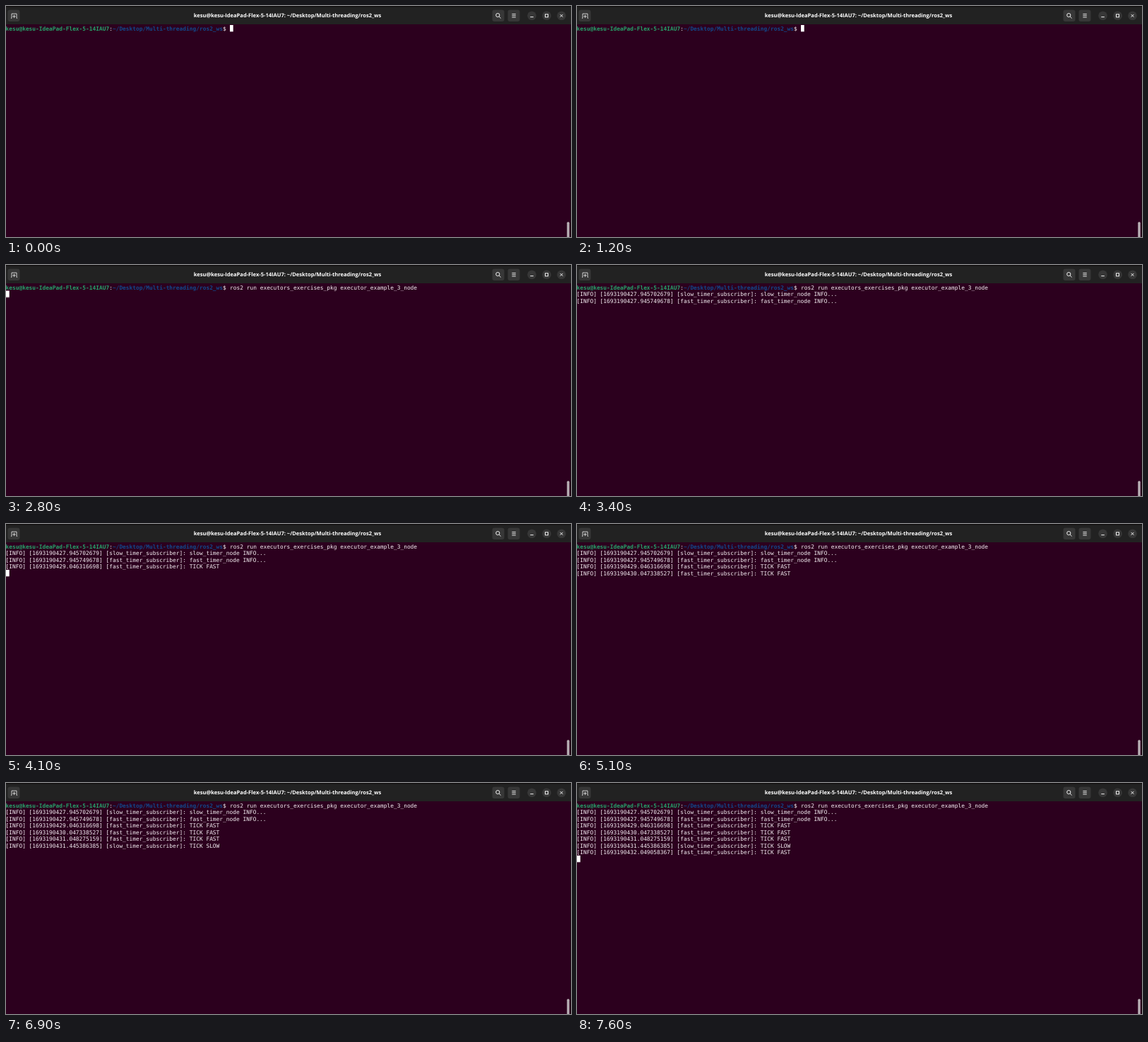
An HTML page for the animation above (8000 ms loop, 800 px wide and 328 px high).

```html
<!DOCTYPE html>
<html lang="en">
<head>
<meta charset="utf-8">
<title>Terminal</title>
<style>
  html, body { margin: 0; width: 100%; height: 100%; overflow: hidden; background: #2c001e; }
  svg { display: block; width: 800px; height: 328px; }
  text { text-rendering: geometricPrecision; white-space: pre; }

  .title { font: 700 7.55px "Open Sans", "Noto Sans", sans-serif; fill: #fff; text-anchor: middle; }
  .term { font: 400 7.873px "DejaVu Sans Mono", monospace; fill: #f4eff2; }
  .user { font-weight: 700; fill: #26a269; }
  .path { font-weight: 700; fill: #12488b; }
  .btn { fill: #373737; }
  .icon { fill: none; stroke: #f2f2f2; stroke-width: 1; }

  .term .late, .cursor { animation: 8s step-end infinite; }
  .term .cmd { animation-name: cmd; }
  .term .info { animation-name: info; }
  .term .tick1 { animation-name: tick1; }
  .term .tick2 { animation-name: tick2; }
  .term .tick3 { animation-name: tick3; }
  .term .slow { animation-name: slow; }
  .term .tick4 { animation-name: tick4; }
  .cursor { fill: #fff; animation-name: cursor; }

  @keyframes cmd   { 0% { opacity: 0 } 26.25%, 100% { opacity: 1 } }
  @keyframes info  { 0% { opacity: 0 } 36.25%, 100% { opacity: 1 } }
  @keyframes tick1 { 0% { opacity: 0 } 51.25%, 100% { opacity: 1 } }
  @keyframes tick2 { 0% { opacity: 0 } 63.75%, 100% { opacity: 1 } }
  @keyframes tick3 { 0% { opacity: 0 } 76.25%, 100% { opacity: 1 } }
  @keyframes slow  { 0% { opacity: 0 } 80%, 100% { opacity: 1 } }
  @keyframes tick4 { 0% { opacity: 0 } 88.75%, 100% { opacity: 1 } }

  /* blinks every 600 ms and moves with the output; a row is 9.5px */
  @keyframes cursor {
    0%     { opacity: 1; transform: translate(317px, 0) }
    6.25%  { opacity: 0; transform: translate(317px, 0) }
    13.75% { opacity: 1; transform: translate(317px, 0) }
    20%    { opacity: 0; transform: translate(317px, 0) }
    26.25% { opacity: 1; transform: translate(583px, 0) }
    33.75% { opacity: 1; transform: translate(0, 9.5px) }
    36.25% { opacity: 1; transform: translate(0, 28.5px) }
    42.5%  { opacity: 0; transform: translate(0, 28.5px) }
    50%    { opacity: 1; transform: translate(0, 28.5px) }
    51.25% { opacity: 1; transform: translate(0, 38px) }
    57.5%  { opacity: 0; transform: translate(0, 38px) }
    65%    { opacity: 1; transform: translate(0, 47.5px) }
    72.5%  { opacity: 0; transform: translate(0, 47.5px) }
    80%    { opacity: 1; transform: translate(0, 66.5px) }
    86.25% { opacity: 0; transform: translate(0, 66.5px) }
    95%, 100% { opacity: 1; transform: translate(0, 76px) }
  }
</style>
</head>
<body>
<svg viewBox="0 0 800 328" xmlns="http://www.w3.org/2000/svg">
  <rect width="800" height="328" fill="#2c001e"/>

  <!-- title bar -->
  <rect width="800" height="26" fill="#222"/>
  <rect width="800" height="1.3" fill="#0e0c0d"/>
  <text class="title" x="398.5" y="16.4">kesu@kesu-IdeaPad-Flex-5-14IAU7: ~/Desktop/Multi-threading/ros2_ws</text>

  <g class="btn">
    <rect x="2.5" y="5.5" width="17" height="16.5" rx="3"/>
    <rect x="688.5" y="5.5" width="17" height="16.5" rx="3"/>
    <rect x="710.5" y="5.5" width="17" height="16.5" rx="3"/>
    <circle cx="744.5" cy="13.8" r="6.3"/>
    <circle cx="765.5" cy="13.8" r="6.3"/>
    <circle cx="786.5" cy="13.8" r="6.3"/>
  </g>
  <g class="icon">
    <path d="M7 17.3H8V11H15V17.3H16M11.5 12.6V17M9.4 14.8H13.6" stroke-width=".8"/>
    <circle cx="696.3" cy="13" r="2.6"/>
    <path d="M698.2 15L700.6 17.4"/>
    <path d="M716.4 11.4H721.8M716.4 13.7H721.8M716.4 16H721.8" stroke-width=".9"/>
    <path d="M742.3 15.6H746.8"/>
    <rect x="763.5" y="11.8" width="4" height="4"/>
    <path d="M784.6 11.9L788.4 15.7M788.4 11.9L784.6 15.7"/>
  </g>

  <!-- shell -->
  <g class="term">
    <text x="-.5" y="34.6"><tspan class="user">kesu@kesu-IdeaPad-Flex-5-14IAU7</tspan>:<tspan class="path">~/Desktop/Multi-threading/ros2_ws</tspan>$</text>
    <text class="late cmd" x="317.1" y="34.6">ros2 run executors_exercises_pkg executor_example_3_node</text>
    <g class="late info">
      <text x="-.5" y="44.1">[INFO] [1693190427.945702679] [slow_timer_subscriber]: slow_timer_node INFO...</text>
      <text x="-.5" y="53.6">[INFO] [1693190427.945749678] [fast_timer_subscriber]: fast_timer_node INFO...</text>
    </g>
    <text class="late tick1" x="-.5" y="63.1">[INFO] [1693190429.046316698] [fast_timer_subscriber]: TICK FAST</text>
    <text class="late tick2" x="-.5" y="72.6">[INFO] [1693190430.047338527] [fast_timer_subscriber]: TICK FAST</text>
    <text class="late tick3" x="-.5" y="82.1">[INFO] [1693190431.048275159] [fast_timer_subscriber]: TICK FAST</text>
    <text class="late slow" x="-.5" y="91.6">[INFO] [1693190431.445386385] [slow_timer_subscriber]: TICK SLOW</text>
    <text class="late tick4" x="-.5" y="101.1">[INFO] [1693190432.049058367] [fast_timer_subscriber]: TICK FAST</text>
  </g>
  <rect class="cursor" x="0" y="27" width="4.7" height="9.4"/>

  <!-- scrollbar -->
  <rect x="794.3" y="306.5" width="3.4" height="24" rx="1.7" fill="#b9b0b5"/>
  <rect x="799" y="26" width="1" height="302" fill="#1b0713"/>
</svg>
</body>
</html>
```
